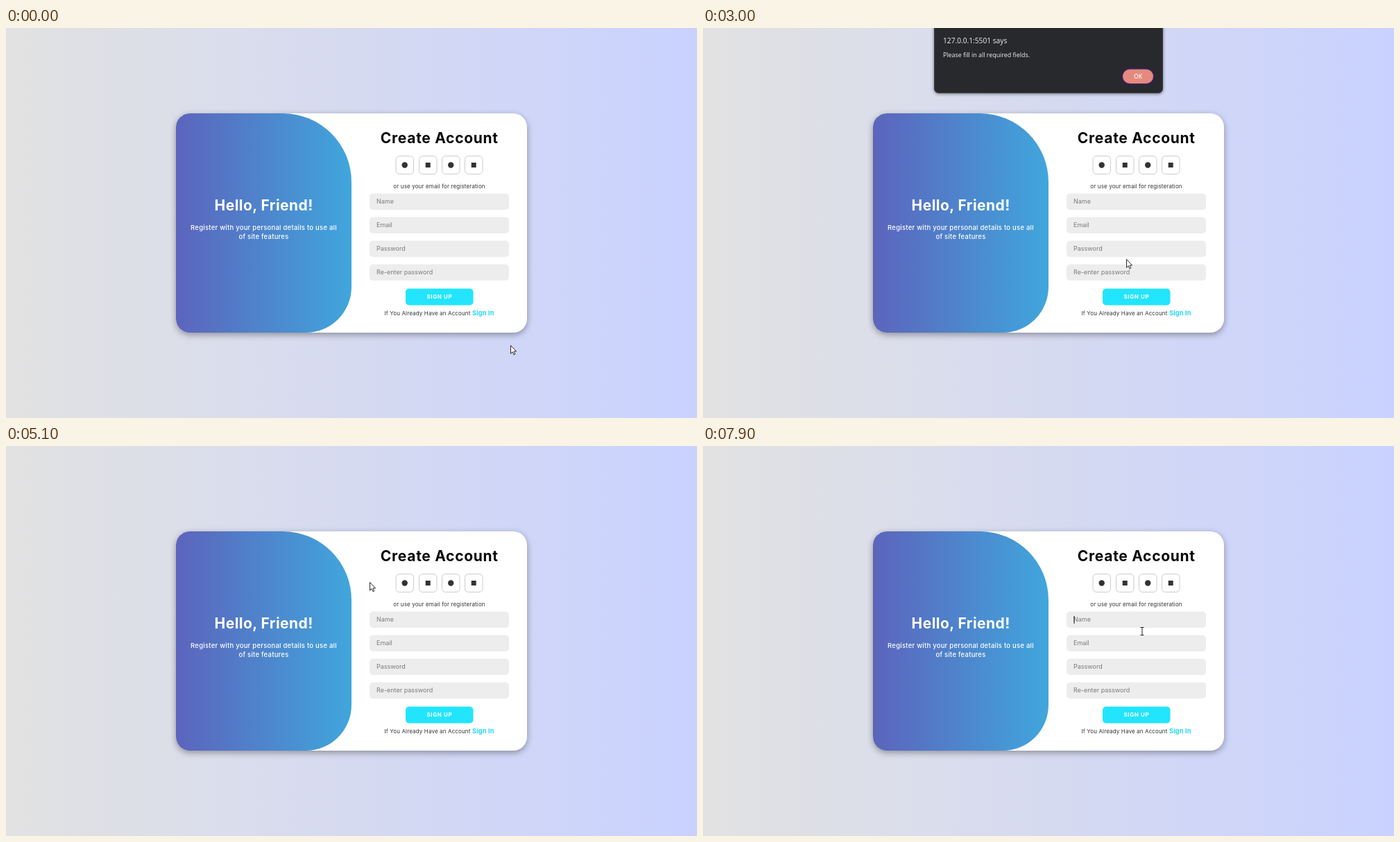
Recreate the animation shown at these times as an HTML page. Size 996x562 px, loop 8000 ms.

```html
<!DOCTYPE html>
<html lang="en">
<head>
<meta charset="utf-8">
<title>Create Account</title>
<style>
  html, body { margin: 0; width: 100%; height: 100%; overflow: hidden; }
  body { background: linear-gradient(to right, #e2e2e2, #c9d2ff); }
  svg { position: absolute; inset: 0; width: 100%; height: 100%; display: block; }
  text { font-family: Inter, sans-serif; }
  .mid { text-anchor: middle; }
  .title { font-size: 21px; font-weight: 700; }
  .lead { font-size: 9.5px; font-weight: 500; letter-spacing: .24px; fill: #fff; }
  .note { font-size: 8px; letter-spacing: .14px; fill: #333; }
  .hint { font-size: 9px; fill: #7b7b7b; }
  .card { filter: drop-shadow(0 3px 5px rgba(0, 0, 0, .35)); }
  .box rect { fill: #fff; stroke: #ccc; }
  .box .mark { fill: #333; stroke: none; }
  .box.on rect { fill: #22e5fd; stroke: #e4fbff; }
  .box.on .mark { fill: #fff; stroke: none; }
  #alert { filter: drop-shadow(0 1px 2px rgba(0, 0, 0, .5)); }
  #alert text { font-family: "Open Sans", sans-serif; fill: #f1f1f3; }
  #cursor path { stroke-linejoin: round; }
</style>
</head>
<body>
<svg viewBox="0 0 996 562">
  <defs>
    <linearGradient id="blue">
      <stop offset="0" stop-color="#5c64bc"/>
      <stop offset="1" stop-color="#40a6dc"/>
    </linearGradient>
  </defs>

  <rect class="card" x="245" y="123" width="506" height="316" rx="20" fill="#fff"/>
  <path fill="url(#blue)" d="M265 123H399A99 99 0 0 1 498 222V373A66 66 0 0 1 432 439H265A20 20 0 0 1 245 419V143A20 20 0 0 1 265 123Z"/>
  <text class="title mid" x="371.7" y="262.5" fill="#fff" letter-spacing=".45">Hello, Friend!</text>
  <text class="lead mid" x="371.5" y="290.5">Register with your personal details to use all</text>
  <text class="lead mid" x="371.5" y="303.7">of site features</text>

  <text class="title mid" x="624.8" y="166" fill="#050507" letter-spacing=".7">Create Account</text>
  <g id="icons"></g>
  <text class="note mid" x="624.5" y="231.3">or use your email for registeration</text>
  <g id="fields"></g>
  <rect id="caret" x="534.5" y="245" width="1" height="11" fill="#111"/>
  <rect x="576" y="375.5" width="97.5" height="24" rx="5" fill="#22e5fd"/>
  <text class="mid" x="624.9" y="390.3" font-size="8" font-weight="700" letter-spacing=".6" fill="#fff">SIGN UP</text>
  <text class="note" x="545.5" y="414.3">If You Already Have an Account</text>
  <text x="672" y="414.3" font-size="9.2" font-weight="700" letter-spacing=".15" fill="#22d7f3">Sign In</text>

  <g id="alert">
    <rect x="333.5" y="-12" width="329" height="105.5" rx="6" fill="#28292c" stroke="#3d3e42"/>
    <text x="346" y="22" font-size="10.2">127.0.0.1:5501 says</text>
    <text x="346" y="42.3" font-size="8.9">Please fill in all required fields.</text>
    <rect x="604" y="58.5" width="46" height="22.5" rx="11.2" fill="#e58a7d" stroke="#37205c" stroke-width="2"/>
    <text class="mid" x="627" y="73" font-size="8.5" font-weight="600">OK</text>
  </g>

  <g id="cursor">
    <path id="arrow" fill="#fff" stroke="#111" stroke-width=".9" d="M.5 .5V12.2L3.1 9.7L5 13.8L6.8 13L5 9H8.6Z"/>
    <path id="hand" fill="#fff" stroke="#111" stroke-width="1" d="M-.9 1.4Q-.9 .3 .3 .3Q1.5 .3 1.5 1.4V6.2Q4 5.7 4 7.2Q6 6.7 6 8.1Q8 7.7 8 9.2V13Q7.7 14.8 6.6 17.5H.6Q-.6 15 -3.4 11.6Q-4.3 10.2 -3.1 9.7Q-2.1 9.3 -.9 11Z"/>
    <path id="beam" fill="none" stroke="#222" d="M-2.5 -5.5H2.5M0 -5.5V5.5M-2.5 5.5H2.5"/>
  </g>
</svg>
<script>
  const LOOP = 8000, STEP = 100;
  const $ = id => document.getElementById(id);
  const show = (id, on) => { $(id).style.display = on ? "" : "none"; };

  const ICON_X = [561.5, 595, 628, 661];
  const MARKS = ["circle", "square", "circle", "square"];
  const mark = (kind, x) => kind === "circle"
    ? `<circle class="mark" cx="${x}" cy="197.5" r="4.2"/>`
    : `<rect class="mark" x="${x - 3.5}" y="194" width="7" height="7"/>`;
  $("icons").innerHTML = ICON_X.map((x, i) => `<g class="box">
    <rect x="${x + .5}" y="184.5" width="25.5" height="26" rx="5"/>${mark(MARKS[i], x + 13.2)}</g>`).join("");
  const boxes = [...document.querySelectorAll(".box")];

  $("fields").innerHTML = ["Name", "Email", "Password", "Re-enter password"].map((label, i) => `
    <rect x="524" y="${238.5 + 34 * i}" width="201" height="23.5" rx="5" fill="#ededed"/>
    <text class="hint" x="534" y="${253.4 + 34 * i}">${label}</text>`).join("");

  // Pointer hotspot: time, x, y
  const track = [
    [0, 727, 457], [900, 622, 434], [1200, 591, 415], [1500, 597, 396],
    [1800, 606, 384], [2700, 607, 382], [2900, 607, 382], [3500, 625, 90],
    [3700, 627, 65], [4600, 627, 65], [5100, 524, 196], [5500, 556, 198],
    [6300, 650, 199], [6600, 653, 198], [6900, 668, 199], [7200, 658, 241],
    [7400, 652, 249], [7700, 652, 249], [7900, 633, 267]
  ];

  function pointer(t) {
    const next = track.findIndex(p => p[0] > t);
    if (next < 0) return track[track.length - 1].slice(1);
    const [t0, x0, y0] = track[next - 1], [t1, x1, y1] = track[next];
    const k = (t - t0) / (t1 - t0);
    return [x0 + (x1 - x0) * k, y0 + (y1 - y0) * k];
  }

  const inside = (x, y, left, top, w, h) => x >= left && x <= left + w && y >= top && y <= top + h;

  function draw(now) {
    const t = Math.floor((now % LOOP) / STEP) * STEP;
    const [x, y] = pointer(t);
    const alerting = t >= 2900 && t < 4600;
    const hovered = alerting ? -1 : ICON_X.findIndex(left => inside(x, y, left, 184, 26.5, 27));
    const onButton = !alerting && inside(x, y, 576, 375, 98, 25);
    const shape = t >= 7200 ? "beam" : hovered >= 0 || onButton ? "hand" : "arrow";

    boxes.forEach((box, i) => box.classList.toggle("on", i === hovered));
    show("alert", alerting);
    show("caret", t >= 7600);
    ["arrow", "hand", "beam"].forEach(id => show(id, id === shape));
    $("cursor").setAttribute("transform", `translate(${Math.round(x)} ${Math.round(y)})`);
  }

  function tick() {
    draw(performance.now());
    requestAnimationFrame(tick);
  }
  tick();
</script>
</body>
</html>
```
